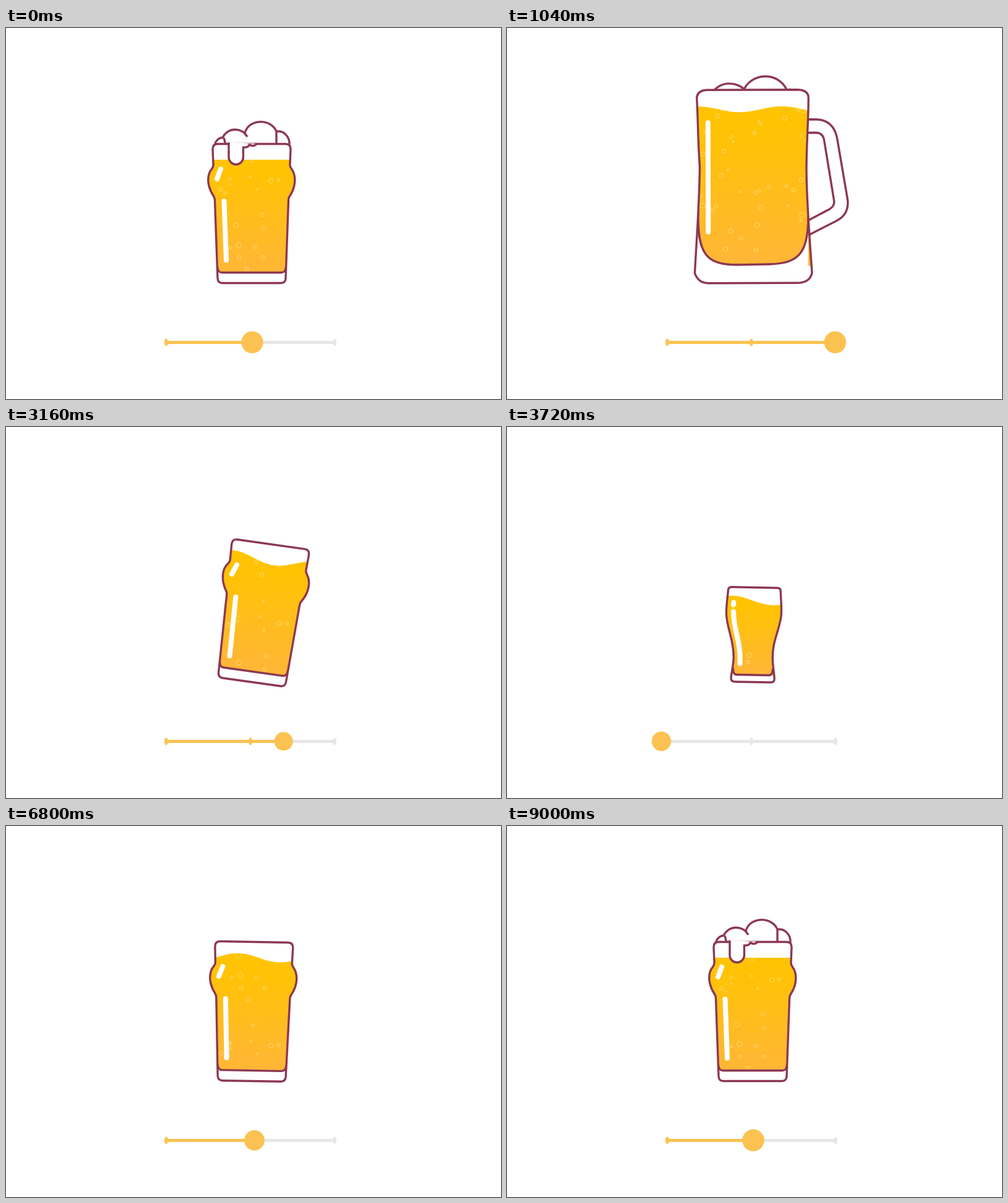
Animation of 800 by 600 pixels, one loop 9040 ms. Source, as an HTML page:

```html
<!DOCTYPE html>
<html lang="en">
<head>
<meta charset="utf-8">
<title>Beer slider</title>
<style>
html, body { margin: 0; width: 100%; height: 100%; overflow: hidden; background: #fff; }
svg { display: block; width: 100vw; height: 100vh; }
.ink { stroke: #8c3753; stroke-width: 3.4; stroke-linejoin: round; fill: none; }
.white { fill: #fff; }
.shine { stroke: #fff; stroke-width: 8; stroke-linecap: round; fill: none; }
.bubble { stroke: #ffe08a; stroke-opacity: .55; stroke-width: 1.4; fill: none; }
</style>
</head>
<body>
<svg id="stage" viewBox="0 0 800 600">
  <defs>
    <linearGradient id="beer" x1="0" y1="0" x2="0" y2="1">
      <stop offset="0" stop-color="#ffc400"/>
      <stop offset=".25" stop-color="#ffc208"/>
      <stop offset="1" stop-color="#ffb638"/>
    </linearGradient>
  </defs>
</svg>
<script>
const LOOP = 9040;
const PIVOT = '397 412';
const YELLOW = '#fbc251', GREY = '#e6e6e6';
const stage = document.getElementById('stage');
const clamp = v => Math.min(1, Math.max(0, v));
const mod = (a, n) => ((a % n) + n) % n;
const easeOut = u => 1 - (1 - u) ** 2;
const backOut = u => 1 + 2.7 * (u - 1) ** 3 + 1.7 * (u - 1) ** 2;

function add(parent, tag, attrs) {
  const node = document.createElementNS('http://www.w3.org/2000/svg', tag);
  for (const key in attrs) node.setAttribute(key, attrs[key]);
  return parent.appendChild(node);
}

function scatter(count, left, right, bottom, height) {
  let seed = 11;
  const rnd = () => (seed = seed * 16807 % 2147483647) / 2147483647;
  return Array.from({ length: count }, () =>
    [left + rnd() * (right - left), bottom - rnd() * height, 1.5 + rnd() * 2.6]);
}

// foam lobes: [path, depth hidden behind the rim]
const specs = {
  small: {
    body: 'M360 259.5H434Q439 259.5 439.5 265C440 280 442 290 441 305C438 330 428 345 428.5 372C428.5 385 432 398 432 407Q432 412.5 426 412.5H368Q362 412.5 362 407C362 398 366 385 365.5 372C365 345 355 330 352.5 305C351.5 290 354 278 354.5 265Q355 259.5 360 259.5Z',
    base: 'M365 390Q364.5 401 371 401H423Q429.5 401 429 390',
    shine: 'M364 284.500L363.500 288M364 299C364 330 377 345 376 383',
    lobes: [['M408 251.500C415 248.500 429 253 432 261', 16], ['M358.500 261C356 236 402 234 411 252', 23]],
    rim: 259.5, level: 280.5, bottom: 400, span: 217,
    foam: { start: 4200, rise: 960, hold: 1750 },
    bubbles: [[391, 300, 4], [389, 311, 2.5], [412, 330, 3.5], [394, 343, 2.5], [387, 373, 3.5], [388, 388, 3.5]],
    at: 5160
  },
  pint: {
    body: 'M342 187.500H452Q460 187.500 460 196L459 220Q458.500 224 461.500 228C469 238 469 256 458.500 272Q456.500 275 456.500 279L452 405Q451.500 412.500 444 412.500H350Q342.500 412.500 342 405L337.500 279Q337.500 275 335.500 272C325 256 324 238 332.500 228Q335.500 224 335 220L334 196Q334 187.500 342 187.500Z',
    base: 'M341.500 386Q342 395.500 349 395.500H445Q452 395.500 452.500 386',
    shine: 'M347 228L341 244M352.500 280L356 375.500',
    lobes: [
      ['M436 167.500C447 165 459 174 458 189', 37],
      ['M337.500 189C339 181 345 177 352 177L355 189', 37],
      ['M386 170C392 146 429 146 437 167.500L437 200H390', 38],
      ['M350 177.500C358 160 381 160 390 176', 30]
    ],
    drip: 'M360 185V209A11.700 11.700 0 0 0 383.400 209V193Q391 194 393.500 188.500Q400 193 405.500 187',
    rim: 187.5, level: 213, bottom: 395, span: 217,
    foam: { start: 7116, rise: 1818, hold: 1984 },
    bubbles: [[362, 244, 2.2], [395, 241, 1.8], [428, 247, 3.5], [347, 261, 3], [354, 267, 2], [405, 261, 1.5],
      [414, 302, 3], [372, 319, 4], [415, 324, 2.5], [402, 354, 2.5], [376, 351, 4.2], [377, 371, 3],
      [415, 371, 2.7], [389, 390, 3], [362, 355, 2], [397, 215, 2], [440, 246, 2.5], [362, 253, 1.6]],
    at: 0
  },
  mug: {
    body: 'M323 100H471Q488 101 488 113C488 150 484 195 484.500 235C485 285 488 320 493 396Q490 412.500 468 412.500H327Q309 413 303.500 396C308 320 311 285 312 225C309 180 309.500 150 307.500 112Q309 101 323 100Z',
    base: 'M309.500 295C307 365 322 383 372 383L425 382C474 381 489 362 487 295',
    shine: 'M325.500 153V329.500',
    handle: 'M410 148H500Q528 149 534 178L551 279Q553 302 533 312L488 335L410 374M410 169.500H500Q511 170 513 181L529 280Q530 288 522 293L488 311L410 350',
    lobes: [
      ['M452 77C468 73 487 86 484 106', 46],
      ['M313 106C316 96 323 90 332 90L336 106', 46],
      ['M382 80C394 47 440 47 453 77L453 125H390', 46],
      ['M331 90C341 67 374 65 388.500 86', 36]
    ],
    drip: 'M335 94.500C337 120 398 120 401 94.500M421 97.500V111.500A13.500 13.500 0 0 0 448 111.500V102H452Q460 108 472 99.500',
    rim: 100, level: 131.5, bottom: 383, span: 250,
    foam: { start: 740, rise: 1050, hold: 2040 },
    bubbles: scatter(38, 314, 484, 383, 250),
    at: 1040
  }
};

const slides = [
  { from: 398, to: 531, t0: 140, t1: 700, over: 7, lag: 0 },
  { from: 531, to: 254, t0: 2860, t1: 3680, over: 12, lag: 60 },
  { from: 254, to: 398, t0: 6160, t1: 6720, over: 7, lag: 0 }
];

function buildGlass(name, spec) {
  const g = add(stage, 'g', {});
  const bodyClip = add(add(g, 'clipPath', { id: name + 'Body' }), 'path', { d: spec.body });
  const surfaceClip = add(add(g, 'clipPath', { id: name + 'Surface' }), 'path', {});
  add(add(g, 'clipPath', { id: name + 'Rim' }), 'rect',
    { x: 200, y: spec.rim - 6, width: 400, height: 100 });

  const handle = spec.handle && add(g, 'path', { class: 'ink', d: spec.handle });
  const lobes = spec.lobes.map(([d, depth]) => ({ depth, node: add(g, 'path', { class: 'ink white', d }) }));
  add(g, 'path', { class: 'white', d: spec.body });

  const inside = add(g, 'g', { 'clip-path': `url(#${name}Body)` });
  const liquid = add(inside, 'g', { 'clip-path': `url(#${name}Surface)` });
  add(liquid, 'rect', {
    x: 290, y: spec.level - 12, width: 220, height: spec.bottom - spec.level + 14, fill: 'url(#beer)'
  });
  const bubbles = spec.bubbles.map(([cx, y, r]) => ({ y, node: add(liquid, 'circle', { class: 'bubble', cx, r }) }));
  add(inside, 'path', { class: 'white', d: spec.base + 'V430H300Z' });
  add(inside, 'path', { class: 'ink', d: spec.base });
  add(g, 'path', { class: 'ink', d: spec.body });
  add(g, 'path', { class: 'shine', d: spec.shine });

  const dripBox = add(g, 'g', { 'clip-path': `url(#${name}Rim)` });
  const drip = spec.drip && add(dripBox, 'path', { class: 'ink white', d: spec.drip });
  return { ...spec, g, surfaceClip, handle, lobes, bubbles, drip };
}

const glasses = Object.fromEntries(Object.entries(specs).map(([name, s]) => [name, buildGlass(name, s)]));

const trackLine = (x2, stroke) => add(stage, 'line', { x1: 259, x2, y1: 508.5, y2: 508.5, stroke, 'stroke-width': 5 });
trackLine(531, GREY);
const filled = trackLine(398, YELLOW);
const ticks = [259, 395, 531].map(cx => ({ cx, node: add(stage, 'ellipse', { cx, cy: 508.5, rx: 3, ry: 6 }) }));
const knob = add(stage, 'circle', { cy: 508.3, fill: YELLOW });

function motionAt(t) {
  let slide = slides.findLast(s => t >= s.t0);
  if (!slide) {
    slide = slides[2];
    t += LOOP;
  }
  const { from, to, t0, t1, over, lag } = slide;
  const dir = Math.sign(to - from);
  const since = t - t1;
  const swing = (time, period) => time > 0 ? Math.exp(-time / 150) * Math.sin(2 * Math.PI * time / period) : 0;
  const ease = (1 - Math.cos(Math.PI * clamp((t - t0) / (t1 - t0)))) / 2;
  const u = clamp((t - t0) / (t1 + lag - t0));
  return {
    x: from + (to - from) * ease + dir * over * swing(since, 500),
    tilt: dir * (1.8 * swing(since - lag, 400) - 12 * Math.sin(Math.PI * u ** 1.36)),
    wave: 7.5 * clamp((t - t0) / 250) * clamp(1 - Math.max(0, since) / 900),
    crest: 349 + .28 * since
  };
}

function pressAt(t) {
  return slides.reduce((sum, s) =>
    sum + (t < s.t1 ? clamp((t - s.t0 + 120) / 120) : 1 - clamp((t - s.t1) / 160)), 0);
}

function drawSurface(glass, wave, crest) {
  let d = '';
  for (let x = 290; x <= 510; x += 4) {
    const y = glass.level - wave * Math.cos(2 * Math.PI * (x - crest) / 135);
    d += (d ? 'L' : 'M') + x + ' ' + y.toFixed(2);
  }
  glass.surfaceClip.setAttribute('d', d + 'V430H290Z');
}

function drawFoam(glass, t) {
  const { start, rise, hold } = glass.foam;
  const age = mod(t - start, LOOP);
  const stay = 1 - clamp((age - hold) / 200);
  const up = easeOut(clamp(age / rise)) * stay;
  for (const { node, depth } of glass.lobes) {
    node.setAttribute('transform', `translate(0 ${(1 - up) * depth})`);
    node.setAttribute('visibility', up > 0 ? 'visible' : 'hidden');
  }
  if (!glass.drip) return;
  const flow = easeOut(clamp((age - 1140) / 460)) * stay;
  glass.drip.setAttribute('transform', `translate(0 ${(flow - 1) * 40})`);
  glass.drip.setAttribute('visibility', flow > 0 ? 'visible' : 'hidden');
}

function drawBubbles(glass, t) {
  const risen = 2 * glass.span * (t - glass.at) / LOOP;
  for (const { y, node } of glass.bubbles) {
    node.setAttribute('cy', glass.bottom - mod(glass.bottom - y + risen, glass.span));
  }
}

function render(t) {
  const { x, tilt, wave, crest } = motionAt(t);
  const current = x > 464.5 ? glasses.mug : x > 326 ? glasses.pint : glasses.small;
  for (const glass of Object.values(glasses)) {
    glass.g.setAttribute('display', glass === current ? 'inline' : 'none');
  }
  current.g.setAttribute('transform', `rotate(${tilt} ${PIVOT})`);
  drawSurface(current, wave, crest);
  drawFoam(current, t);
  drawBubbles(current, t);
  if (current.handle) {
    const out = backOut(clamp((t - 420) / 330)) * (1 - clamp((t - 2720) / 180));
    current.handle.setAttribute('transform', `translate(${(out - 1) * 70} 0)`);
  }

  filled.setAttribute('x2', Math.max(259, x));
  for (const { cx, node } of ticks) node.setAttribute('fill', x >= cx ? YELLOW : GREY);
  knob.setAttribute('cx', x);
  knob.setAttribute('r', 17.8 - 2.8 * pressAt(t));
}

const began = performance.now();
function tick() {
  render((performance.now() - began) % LOOP);
  requestAnimationFrame(tick);
}
render(0);
requestAnimationFrame(tick);
</script>
</body>
</html>
```
